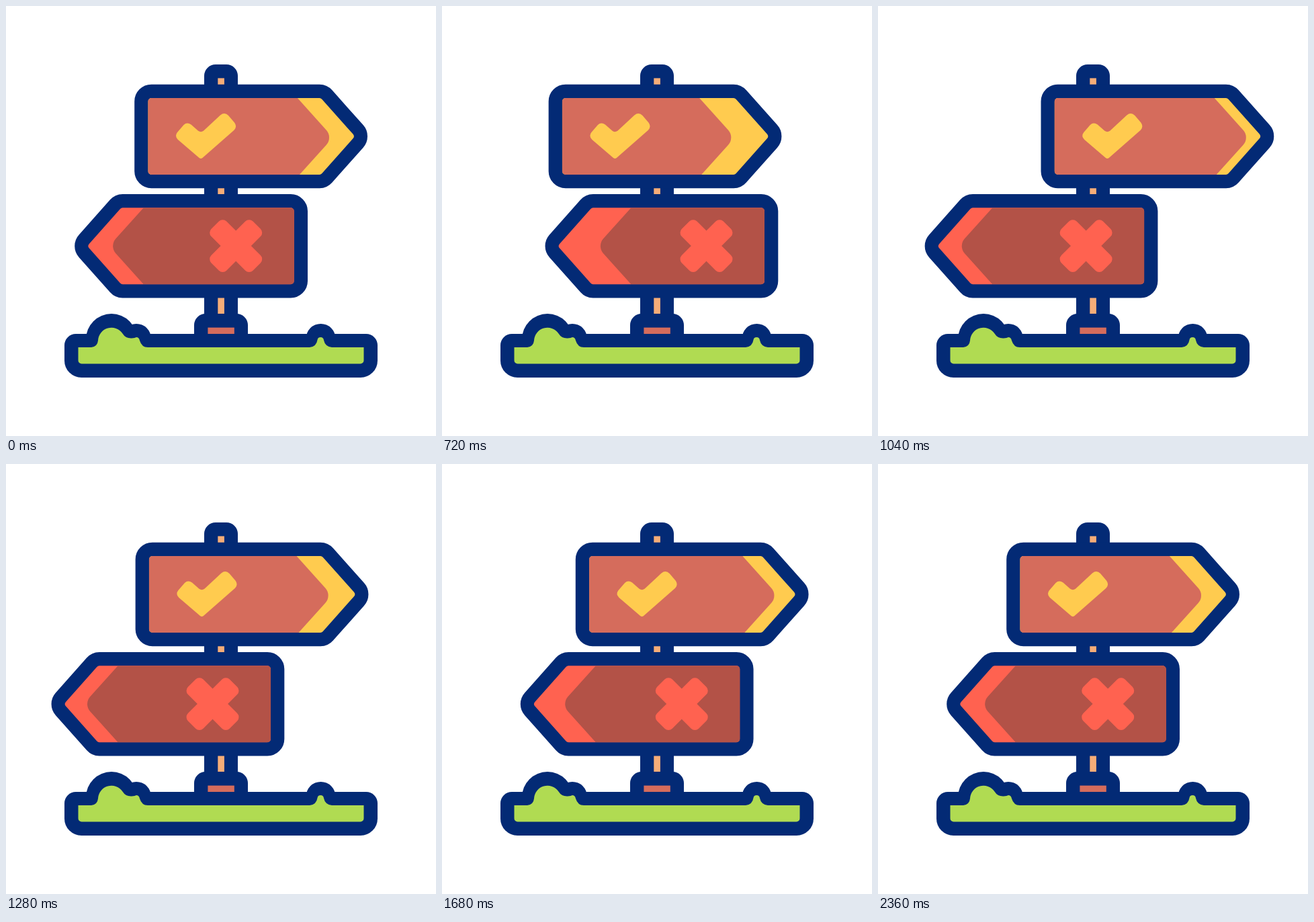
Write an HTML page that moves like this. It is 640 px wide and 640 px high and loops after 3000 ms.

```html
<!DOCTYPE html>
<html lang="en">
<head>
<meta charset="utf-8">
<title>Signpost</title>
<style>
  html, body { margin: 0; width: 100%; height: 100%; overflow: hidden; background: #fff; }
  svg { display: block; width: 100vw; height: 100vh; }
  .navy { fill: #032a75; }
  .rim { fill: none; stroke: #032a75; stroke-width: 40.6; }
  .wood { fill: #d56c5c; }
  .dark { fill: #b35247; }
  .yellow { fill: #ffcb4f; }
  .red { fill: #ff6250; }
  .grass { fill: #b0db52; }
  .core { fill: #f6ad78; }
</style>
</head>
<body>
<svg viewBox="0 0 640 640">
  <defs>
    <path id="board" d="M216.5 137H466.5A5 5 0 0 1 470.2 138.7L516.4 190.6A5 5 0 0 1 516.4 197.3L470.2 249.2A5 5 0 0 1 466.5 250.9H216.5A5 5 0 0 1 211.5 245.9V142A5 5 0 0 1 216.5 137Z"/>
    <path id="panel" d="M150 130H427.6L476.8 184.7A16.5 16.5 0 0 1 476.8 206.7L430.6 258H150Z"/>
    <rect id="bar" x="-43.8" y="-16" width="87.6" height="32" rx="8"/>
    <clipPath id="inside"><use href="#board"/></clipPath>
  </defs>

  <!-- post and base -->
  <rect class="navy" x="295" y="87" width="50" height="400" rx="17"/>
  <rect class="core" x="315.3" y="107.4" width="9.6" height="351"/>
  <rect class="navy" x="280" y="458" width="80" height="60" rx="17"/>
  <rect class="wood" x="300.4" y="478.6" width="39.4" height="9.6"/>

  <!-- ground -->
  <g class="navy">
    <circle cx="157" cy="496" r="38"/>
    <circle cx="194" cy="494.7" r="21.8"/>
    <circle cx="468.5" cy="494.7" r="21.8"/>
    <path d="M87 505a17 17 0 0 1 17-17H536a17 17 0 0 1 17 17V527.7a25.3 25.3 0 0 1-25.3 25.3H112.3A25.3 25.3 0 0 1 87 527.7Z"/>
  </g>
  <path class="grass" d="M107.5 508H127Q136 507 137 498A20 20 0 0 1 173.5 487.5Q178 495 187 494.5Q192 494 194 493Q198 493 199 498Q202 508 211 508H452Q462 507 463.5 497Q464 493 468.3 493Q472.5 493 473 497.5Q475 507 485 508H532.5V527.5a5 5 0 0 1-5 5H112.5a5 5 0 0 1-5-5Z"/>

  <!-- right-pointing sign -->
  <g id="yes">
    <use href="#board" class="rim"/>
    <use href="#board" class="yellow"/>
    <g clip-path="url(#inside)"><use id="yesPanel" href="#panel" class="wood"/></g>
    <path class="yellow" d="M275.5 176.5L286 185.8Q290 188.6 294 185.8L319 162.4Q325.5 157.5 331 163L340 173.5Q344.5 179.5 339.5 184.7L292.5 226Q290 228 287.5 226L256 199Q250.5 193.5 255 188L264.5 177Q269.5 172.3 275.5 176.5Z"/>
  </g>

  <!-- left-pointing sign, mirrored -->
  <g transform="translate(640.2 163.3) scale(-1 1)">
    <g id="no">
      <use href="#board" class="rim"/>
      <use href="#board" class="red"/>
      <g clip-path="url(#inside)"><use id="noPanel" href="#panel" y="-1.7" class="dark"/></g>
      <g class="red" transform="translate(298 193.8)">
        <use href="#bar" transform="rotate(45)"/>
        <use href="#bar" transform="rotate(-45)"/>
      </g>
    </g>
  </g>
</svg>
<script>
  const LOOP = 3000, STEP = 40, LAG = 120;
  const keys = [200, 600, 1040, 1440, 1840, 2240];
  const sway = [0, -51.3, 51.3, -25.65, 25.65, 0];
  const yesShift = [0, -25.65, 15.5, -12.8, 16, 0];
  const noShift = [0, -25.4, 8, -12.8, 2.6, 0];

  // Eased value between neighbouring keys
  function at(values, t) {
    if (t <= keys[0] || t >= keys[5]) return 0;
    const i = keys.findIndex(k => k > t) - 1;
    const x = (t - keys[i]) / (keys[i + 1] - keys[i]);
    return values[i] + (values[i + 1] - values[i]) * x * x * (3 - 2 * x);
  }

  function slide(id, dx) {
    document.getElementById(id).setAttribute("transform", `translate(${dx.toFixed(2)} 0)`);
  }

  function draw() {
    // The motion advances in 40 ms steps
    const t = Math.floor((performance.now() % LOOP + 0.5) / STEP) * STEP;
    slide("yes", at(sway, t));
    slide("yesPanel", at(yesShift, t));
    slide("no", at(sway, t - LAG));
    slide("noPanel", at(noShift, t - LAG));
    requestAnimationFrame(draw);
  }
  draw();
</script>
</body>
</html>
```
